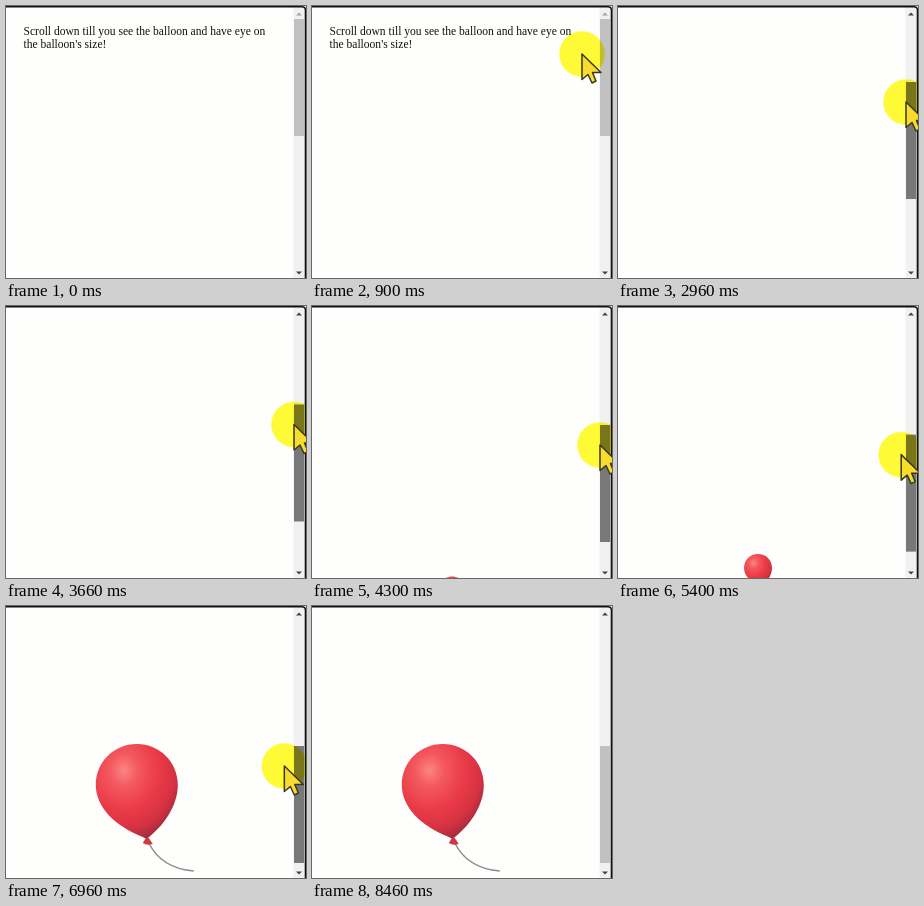
These frames come from a looping animation (300x272 px, 8.6 s). An HTML page:

```html
<!DOCTYPE html>
<html lang="en">
<head>
<meta charset="utf-8">
<title>Scroll to the balloon</title>
<style>
  html, body { margin: 0; width: 100%; height: 100%; overflow: hidden; background: #fefefd; }
  svg { display: block; width: 300px; height: 272px; }
  text { font: 11.55px "Liberation Serif", "Times New Roman", serif; fill: #111; }
  #halo { mix-blend-mode: multiply; }
</style>
</head>
<body>
<svg viewBox="0 0 300 272">
  <defs>
    <radialGradient id="skin" cx=".34" cy=".28" r=".78">
      <stop offset="0" stop-color="#fb8584"/>
      <stop offset=".22" stop-color="#f4595f"/>
      <stop offset=".55" stop-color="#ea3a48"/>
      <stop offset=".8" stop-color="#d63242"/>
      <stop offset="1" stop-color="#9d2a3d"/>
    </radialGradient>
    <radialGradient id="glow">
      <stop offset=".93" stop-color="#fffb35"/>
      <stop offset="1" stop-color="#fffb35" stop-opacity="0"/>
    </radialGradient>
  </defs>

  <rect width="300" height="272" fill="#fefefd"/>
  <g id="page">
    <text x="17.5" y="29">Scroll down till you see the balloon and have eye on</text>
    <text x="17.5" y="42">the balloon's size!</text>
    <!-- origin at the foot of the balloon -->
    <g id="balloon">
      <path d="M-2 -28C5 -14 18 -2 43 0" fill="none" stroke="#8d8b8b" stroke-width="1.5"/>
      <path d="M-5 -33L-8 -28Q-4 -25 2 -27L-2 -33Z" fill="#d43645"/>
      <path d="M-14 -127C9 -127 27 -109 27 -86C27 -63 10 -43 -3 -33Q-5 -32 -8 -34C-36 -45 -55 -64 -55 -86C-55 -109 -37 -127 -14 -127Z" fill="url(#skin)"/>
    </g>
  </g>

  <rect x="287.5" width="12.5" height="272" fill="#f1f1f1"/>
  <rect id="thumb" x="288" width="10" height="117"/>
  <path id="up" d="M290 9.5L293 6.5L296 9.5Z"/>
  <path d="M290 265.5L293 268.5L296 265.5Z" fill="#444"/>
  <path d="M0 .7H296Q299.4 .7 299.4 4V272" fill="none" stroke="#111" stroke-width="1.4"/>

  <circle id="halo" r="23.5" fill="url(#glow)"/>
  <path id="arrow" d="M0 0V25.5L6 20.5L10 29L14 27L10.5 18.5H19Z" fill="#f8dc2c" stroke="#3a3621" stroke-width="1.5" stroke-linejoin="round"/>
</svg>
<script>
const LOOP = 8600;
const THUMB_TOP = 13, PAGE_RATIO = 2.32, GRIP = 20;
const GRAB = 1760, RELEASE = 7000;
const FOOT_Y = 265 + (140 - THUMB_TOP) * PAGE_RATIO;

// Keys are [time, value]
const thumbKeys = [[1800, 13], [2230, 31], [2960, 76], [4300, 119],
  [5900, 133], [6130, 133], [6260, 134], [6450, 140]];
const cursorX = [[250, 330], [860, 274], [900, 270], [1020, 268], [1250, 270], [1650, 290],
  [2230, 290], [2960, 288], [4300, 288], [5900, 281], [6260, 281], [7050, 278], [7750, 326]];
const cursorY = [[250, 64], [900, 48], [1250, 44], [1650, 33]];
const leaveY = [[7000, 160], [7750, 68]];

const $ = id => document.getElementById(id);
const smooth = p => p * p * (3 - 2 * p);

function track(keys, t) {
  if (t <= keys[0][0]) return keys[0][1];
  for (let i = 1; i < keys.length; i++) {
    const [t0, a] = keys[i - 1], [t1, b] = keys[i];
    if (t < t1) return a + (b - a) * (t - t0) / (t1 - t0);
  }
  return keys[keys.length - 1][1];
}

function draw(t) {
  const top = track(thumbKeys, t);
  const held = t >= GRAB && t < RELEASE;
  const x = track(cursorX, t);
  const y = held ? top + GRIP : track(t < GRAB ? cursorY : leaveY, t);
  const size = .341 + .659 * smooth(track([[6430, 0], [6920, 1]], t));
  const hover = x >= 288 && x < 299 && y > top && y < top + 117;

  $('page').setAttribute('transform', `translate(0 ${-(top - THUMB_TOP) * PAGE_RATIO})`);
  $('balloon').setAttribute('transform', `translate(144.8 ${FOOT_Y}) scale(${size})`);
  $('thumb').setAttribute('y', top);
  $('thumb').setAttribute('fill', held ? '#787878' : hover ? '#a8a8a8' : '#c1c1c1');
  $('up').setAttribute('fill', top > THUMB_TOP ? '#444' : '#a3a3a3');
  for (const id of ['halo', 'arrow']) $(id).setAttribute('transform', `translate(${x} ${y})`);
}

const start = performance.now();
function frame() {
  draw((performance.now() - start) % LOOP);
  requestAnimationFrame(frame);
}
frame();
</script>
</body>
</html>
```
